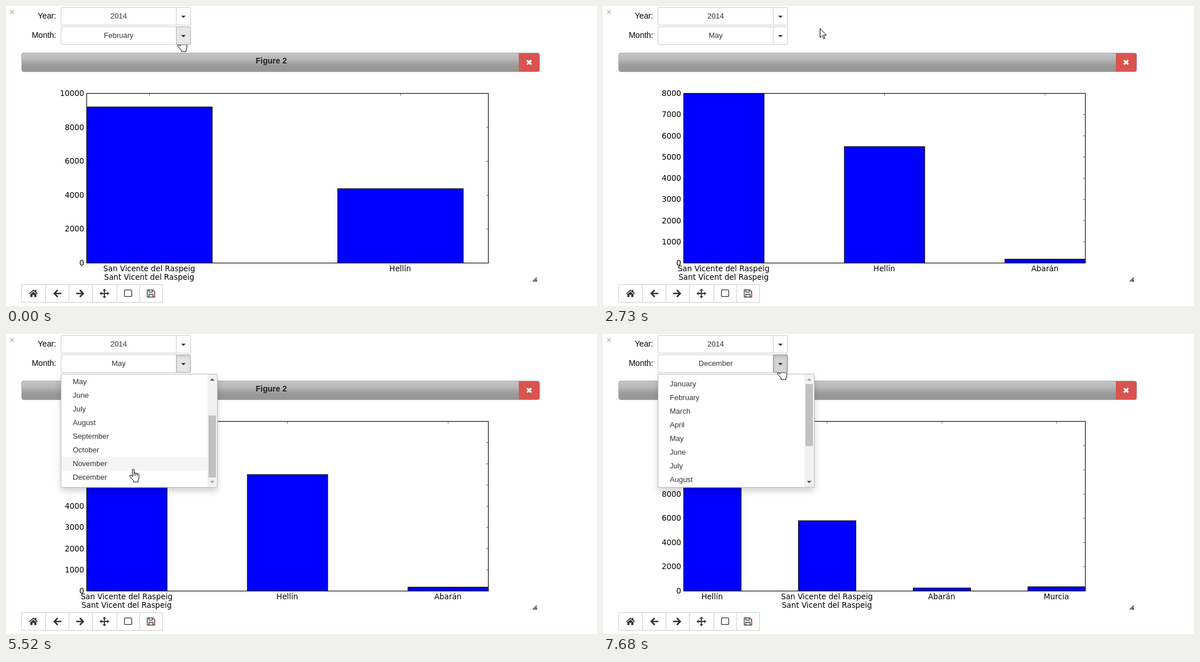
An HTML page for the animation above (8000 ms loop, 1036 px wide and 527 px high).

```html
<!DOCTYPE html>
<html lang="en">
<head>
<meta charset="utf-8">
<title>Monthly chart</title>
<style>
html, body { margin: 0; width: 100%; height: 100%; overflow: hidden; background: #fff; }
body { position: relative; font: 13px "Liberation Sans", Arial, sans-serif; color: #333; }
svg { position: absolute; left: 0; top: 0; }
.btn { position: absolute; box-sizing: border-box; height: 32px; border: 1px solid #ccc; background: #fff; line-height: 29px; text-align: center; }
.main { left: 96px; width: 203px; border-radius: 2px 0 0 2px; }
.drop { left: 298px; width: 26px; border-radius: 0 2px 2px 0; }
.drop::after { content: ""; position: absolute; left: 8px; top: 14px; border: 4px solid transparent; border-top-color: #333; border-bottom: 0; }
.hover { background: #e6e6e6; border-color: #adadad; z-index: 1; }
.open { box-shadow: inset 0 3px 5px rgba(0,0,0,.125); }
.focus { background: #d4d4d4; border-color: #8c8c8c; }
#bar { position: absolute; box-sizing: border-box; left: 27px; top: 82px; width: 909px; height: 34px; border: 1px solid #aaa; border-radius: 4px; background: linear-gradient(#c5c5c5, #b9b9b9 30%, #989898 72%, #979797); }
#close { position: absolute; left: 899px; top: 83px; width: 36px; height: 32px; background: #d9534f; border-radius: 0 3px 3px 0; }
#menu { position: absolute; box-sizing: border-box; left: 96px; top: 70px; width: 275px; height: 200px; border: 1px solid #bbb; border-radius: 2px; background: #fff; overflow: hidden; box-shadow: 0 6px 12px rgba(0,0,0,.175); }
#list { padding: 5px 0; margin-right: 17px; }
#list div { height: 24px; line-height: 24px; padding-left: 20px; }
#list .on { background: #f5f5f5; }
#track { position: absolute; right: 0; top: 0; width: 17px; height: 198px; background: #f1f1f1; }
#thumb { position: absolute; left: 2px; top: 17px; width: 13px; height: 109px; }
#tools i { position: absolute; box-sizing: border-box; top: 489px; height: 32px; border: 1px solid #ccc; }
</style>
</head>
<body>
<div class="btn main" style="top:2px">2014</div><div class="btn drop" style="top:2px"></div>
<div class="btn main" id="month" style="top:36px"></div><div class="btn drop" id="drop" style="top:36px"></div>
<div id="bar"></div><div id="close"></div>
<div id="tools"></div>
<svg width="1036" height="527">
  <g font-size="14" text-anchor="end" fill="#000">
    <text x="88" y="22">Year:</text><text x="88" y="56">Month:</text>
  </g>
  <path d="M7.3 7.3l6.4 6.4m0-6.4l-6.4 6.4" stroke="#c2c2c2" stroke-width="1.8"/>
  <path d="M913.3 95.3l7.4 7.4m0-7.4l-7.4 7.4" stroke="#fff" stroke-width="3.2"/>
  <text id="title" x="465" y="101" font-size="14" font-weight="bold" text-anchor="middle" fill="#222">Figure 2</text>
  <path d="M923.5 484l7-7m-4 7l4-4m-2 4.5l2.5-2.5" stroke="#222" stroke-width="1.2"/>
  <g id="icons" fill="#333" stroke="#333" stroke-width="0">
    <g transform="translate(48 505)"><path d="M-8 .2L0-7L2.8-4.5V-6.3H5.3V-2.2L8 .2L7 1.4L0-4.8L-7 1.4ZM-5.4 1.6L0-3.2L5.4 1.6V6.2H1.5V2.2H-1.5V6.2H-5.4Z"/></g>
    <g transform="translate(90 505)" fill="none" stroke-width="2.7"><path id="arrow" d="M7 0H-5M.6-6L-5.4 0L.6 6"/></g>
    <use href="#arrow" transform="translate(130 505) scale(-1 1)" fill="none" stroke-width="2.7"/>
    <g transform="translate(172.5 505)"><path d="M-6 0H6M0-6V6" stroke-width="2"/><path d="M0-8.5L3.2-5H-3.2ZM0 8.5L3.2 5H-3.2ZM-8.5 0L-5-3.2V3.2ZM8.5 0L5-3.2V3.2Z"/></g>
    <rect x="207.6" y="498.6" width="12.8" height="11.8" rx="2" fill="none" stroke-width="1.3"/>
    <g transform="translate(254 505)" fill="none" stroke-width="1.3"><path d="M-6.4-6.4H3.4L6.4-3.4V6.4H-6.4ZM-3.5-6V-2.3H2.5V-6M-3.5 6V1.5H3.6V6"/><path d="M6.9-3V6.6" stroke="#e22" stroke-width="1"/></g>
  </g>
  <g id="plots" font-family="DejaVu Sans, sans-serif" font-size="13.33" fill="#000"></g>
</svg>
<div id="menu">
  <div id="list"></div>
  <div id="track"><div id="thumb"></div>
    <svg width="17" height="198"><path id="up" d="M4.5 11L8.5 7L12.5 11Z"/><path id="down" d="M4.5 187L8.5 191L12.5 187Z"/></svg>
  </div>
</div>
<svg width="1036" height="527">
  <g id="cursor" fill="#fff" stroke="#000" stroke-linejoin="round">
    <path id="pointer" d="M.5 .5V16.5L4.2 13L6.8 18.6L9 17.7L6.5 12.2H11.6Z"/>
    <g id="hand" transform="translate(-6 0)">
      <path d="M5.5 13.5V2a1.5 1.5 0 0 1 3 0V8a1.4 1.4 0 0 1 2.9 .5a1.4 1.4 0 0 1 2.9 .8a1.4 1.4 0 0 1 2.7 1V16q0 2-1.3 3.8V23H7.3V20.5L2 14.5Q.2 11.8 1.4 11q1.5-.7 4.1 2.5z"/>
      <path d="M8.5 8V12M11.4 8.5V12M14.3 9.3V12" fill="none"/>
    </g>
  </g>
</svg>
<script>
const $ = id => document.getElementById(id);
const LOOP = 8000, STEP = 77;
const months = "January February March April May June July August September October November December".split(" ");
const vicente = ["San Vicente del Raspeig", "Sant Vicent del Raspeig"];

const charts = [
  { max: 10000, step: 2000, span: 1.6, bars: [[9200, vicente], [4380, ["Hellín"]]] },
  { max: 8000, step: 1000, span: 2.5, bars: [[8000, vicente], [5490, ["Hellín"]], [180, ["Abarán"]]] },
  { max: 14000, step: 2000, span: 3.5, bars: [[12500, ["Hellín"]], [5800, vicente], [250, ["Abarán"]], [350, ["Murcia"]]] }
];

function drawChart({ max, step, span, bars }) {
  const L = 141.5, R = 845.5, T = 153.5, B = 451.5, unit = (R - L) / span;
  const py = v => B - v / max * (B - T);
  let rects = "", ticks = "", text = "";
  bars.forEach(([value, lines], i) => {
    const x = L + i * unit, mid = x + unit / 4;
    rects += `<rect x="${x}" y="${py(value)}" width="${unit / 2}" height="${B - py(value)}"/>`;
    ticks += `M${mid} ${T}v4M${mid} ${B}v-4`;
    lines.forEach((s, n) => text += `<text x="${mid - .5}" y="${466 + 15 * n}" text-anchor="middle">${s}</text>`);
  });
  for (let v = 0; v <= max; v += step) {
    ticks += `M${L} ${py(v)}h4M${R} ${py(v)}h-4`;
    text += `<text x="137" y="${py(v) + 4.5}" text-anchor="end">${v}</text>`;
  }
  return `<g><g fill="#00f" stroke="#000" stroke-width="1.1">${rects}</g>
    <path d="${ticks}" stroke="#000" stroke-width=".6"/>
    <rect x="${L}" y="${T}" width="${R - L}" height="${B - T}" fill="none" stroke="#000" stroke-width="1.1"/>${text}</g>`;
}

$("plots").innerHTML = charts.map(drawChart).join("");
$("list").innerHTML = months.map(m => `<div>${m}</div>`).join("");
const edges = [27, 69, 110, 151, 194, 234, 274];
$("tools").innerHTML = edges.slice(1).map((x, i) =>
  `<i style="left:${edges[i]}px;width:${x - edges[i] + 1}px"></i>`).join("");

// Cursor moves: start time, number of steps, end point
const moves = [
  [80, 3, 311, 57], [710, 4, 186, 168], [1020, 4, 170, 179], [2500, 4, 380, 39],
  [2960, 5, 310, 55], [3810, 3, 356, 136], [4190, 3, 364, 147.5], [4580, 1, 364, 155],
  [4650, 5, 360, 202.5], [5130, 8, 176, 249], [6140, 1, 294, 65], [6290, 2, 310, 59],
  [6680, 1, 310, 58], [6980, 1, 311, 57]
];

function cursorAt(t) {
  let x = 306, y = 57;
  for (const [start, n, ex, ey] of moves) {
    if (t < start - 5) break;
    const k = Math.min(1, (Math.floor((t - start + 5) / STEP) + 1) / n);
    x += (ex - x) * k;
    y += (ey - y) * k;
  }
  return [x, y];
}

const within = (t, ...spans) => spans.some(([a, b]) => t >= a && t < b);
const show = (el, on) => el.style.display = on ? "" : "none";

function render(t) {
  const [x, y] = cursorAt(t);
  const open = within(t, [390, 1330], [3490, 5840], [7680, LOOP]);
  const pressed = within(t, [310, 1330], [3490, 5840], [7380, LOOP]);
  const focus = pressed && !within(t, [4500, 5840]);
  const onRow = y >= 36 && y < 68;
  const onMain = onRow && x >= 96 && x < 298, onDrop = onRow && x >= 298 && x < 324;
  const onList = x > 96 && x < 357 && y > 70 && y < 270;

  $("month").textContent = months[t < 1330 ? 1 : t < 5840 ? 4 : 11];
  $("month").className = "btn main" + (onMain ? " hover" : "");
  $("drop").className = "btn drop" + (onDrop || pressed ? " hover" : "") + (pressed ? " open" : "") + (focus ? " focus" : "");

  const chart = t < 1720 ? 0 : within(t, [1810, 6140]) ? 1 : t >= 6290 ? 2 : -1;
  [...$("plots").children].forEach((g, i) => show(g, i === chart));
  show($("title"), t < 1720 || within(t, [3110, 6140]));

  show($("menu"), open);
  const drag = within(t, [4500, 5125]);
  const shift = drag ? y - 147.5 : within(t, [5125, 5840]) ? 55 : 0;
  const scroll = Math.round(shift * 100 / 55);
  const row = onList ? Math.floor((y - 76 + scroll) / 24) : -1;
  $("list").style.transform = `translateY(${-scroll}px)`;
  [...$("list").children].forEach((el, i) => el.className = i === row ? "on" : "");
  $("thumb").style.top = 17 + Math.floor(shift) + "px";
  $("thumb").style.background = drag ? "#787878" : x >= 357 && x < 369 && y > 88 ? "#a8a8a8" : "#c1c1c1";
  $("up").style.fill = scroll ? "#505050" : "#a3a3a3";
  $("down").style.fill = scroll < 100 ? "#505050" : "#a3a3a3";

  const hand = onMain || onDrop || onList && within(t, [390, 1410], [3490, 5990]);
  show($("hand"), hand);
  show($("pointer"), !hand);
  $("cursor").setAttribute("transform", `translate(${Math.round(x)} ${Math.round(y)})`);
}

const begin = performance.now();
function tick() {
  render((performance.now() - begin) % LOOP);
  requestAnimationFrame(tick);
}
tick();
</script>
</body>
</html>
```
